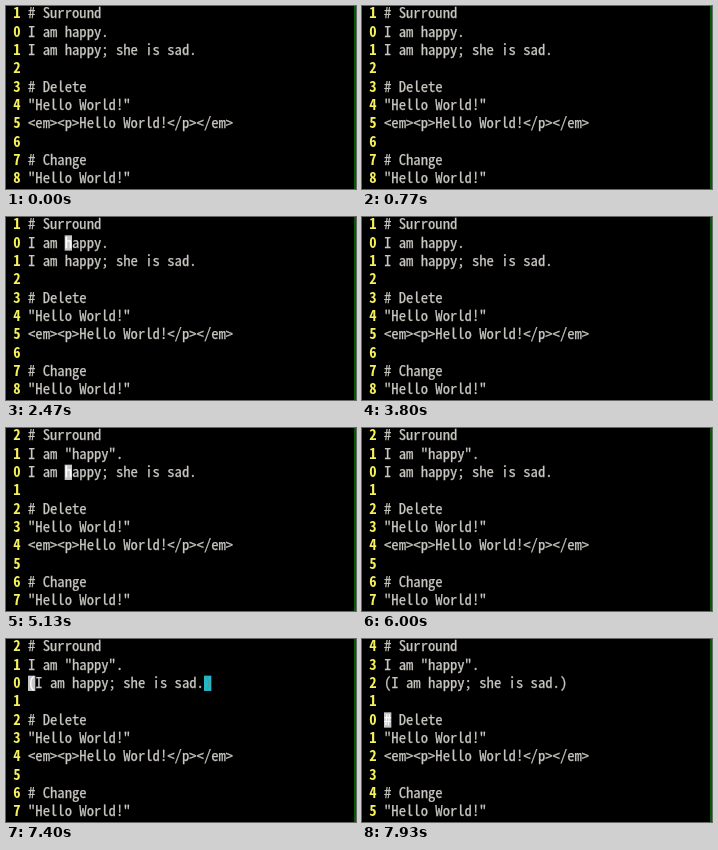
These frames come from a looping animation (350x183 px, 8 s). An HTML page:

```html
<!DOCTYPE html>
<html lang="en">
<head>
<meta charset="utf-8">
<title>Surround demo</title>
<style>
  html, body { margin: 0; width: 100%; height: 100%; overflow: hidden; background: #000; }
  svg { display: block; width: 350px; height: 183px; }
  text {
    font-family: "Noto Sans Mono CJK JP", "Noto Sans Mono", "DejaVu Sans Mono", monospace;
    font-variant-ligatures: none;
    fill: #c9c7c1;
    stroke: #c9c7c1;
    stroke-width: .25px;
  }
  .number { font-weight: 700; fill: #f6f05c; stroke: none; }
  .under { fill: #fff; stroke: #fff; }
  .paired { fill: #4f9aa2; stroke: none; }
</style>
</head>
<body>
<svg id="stage" viewBox="0 0 350 183"></svg>
<script>
const LOOP = 8000;
const CELL = 22 / 3, PITCH = 55 / 3, LEFT = 22, BASE = 12.3;
const FONTS = '"Noto Sans Mono CJK JP", "Noto Sans Mono", "DejaVu Sans Mono", monospace';
const stage = document.getElementById('stage');

const LINES = [
  '# Surround', 'I am happy.', 'I am happy; she is sad.', '',
  '# Delete', '"Hello World!"', '<em><p>Hello World!</p></em>', '',
  '# Change', '"Hello World!"'
];

// Times at which a line is rewritten.
const EDITS = [
  { at: 4330, row: 1, text: 'I am "happy".' },
  { at: 7200, row: 2, text: '(I am happy; she is sad.)' }
];

// Spans in which the block cursor is lit; "fade" marks a soft appearance.
const CURSOR = [
  { from: 270, to: 770, row: 1, col: 0, fade: true },
  { from: 1270, to: 1770, row: 1, col: 0, fade: true },
  { from: 2000, to: 2400, row: 1, col: 2, fade: true },
  { from: 2400, to: 3800, row: 1, col: 5 },
  { from: 4330, to: 5000, row: 1, col: 5, fade: true },
  { from: 5000, to: 5830, row: 2, col: 5 },
  { from: 6330, to: 6630, row: 2, col: 5, fade: true },
  { from: 7200, to: 7630, row: 2, col: 0, match: 24, fade: true },
  { from: 7630, to: 8000, row: 4, col: 0 }
];

function add(tag, attrs, parent = stage) {
  const node = document.createElementNS('http://www.w3.org/2000/svg', tag);
  for (const key in attrs) node.setAttribute(key, attrs[key]);
  return parent.appendChild(node);
}

// Pick the font size whose advance equals one terminal cell.
function cellFontSize() {
  const pen = document.createElement('canvas').getContext('2d');
  pen.font = '100px ' + FONTS;
  return 100 * CELL / pen.measureText('M').width;
}

const cellX = col => LEFT + col * CELL;
const baseline = row => BASE + row * PITCH;

function addBlock(fill, glyphClass) {
  const group = add('g', {});
  add('rect', { width: CELL, height: 15.3, fill }, group);
  const glyph = add('text', { y: BASE, class: glyphClass }, group);
  return { group, glyph };
}

function placeBlock(block, row, col, char, opacity) {
  block.group.setAttribute('transform', `translate(${cellX(col)} ${row * PITCH})`);
  block.group.setAttribute('opacity', opacity);
  block.glyph.textContent = char;
}

stage.style.fontSize = cellFontSize() + 'px';
add('rect', { width: 350, height: 183, fill: '#000' });
add('rect', { x: 348, width: 2, height: 183, fill: '#075807' });
const rows = LINES.map((_, row) => ({
  number: add('text', { x: cellX(-2), y: baseline(row), class: 'number' }),
  text: add('text', { x: LEFT, y: baseline(row) })
}));
const matchBlock = addBlock('#1fbac6', 'paired');
const cursorBlock = addBlock('#c7c7c7', 'under');

function render(time) {
  const lines = LINES.slice();
  for (const edit of EDITS) if (time >= edit.at) lines[edit.row] = edit.text;

  const current = time < 5000 ? 1 : time < 7630 ? 2 : 4;
  rows.forEach((row, i) => {
    row.number.textContent = Math.abs(i - current);
    row.text.textContent = lines[i];
  });

  const span = CURSOR.find(s => time >= s.from && time < s.to);
  cursorBlock.group.style.display = span ? '' : 'none';
  matchBlock.group.style.display = span && span.match ? '' : 'none';
  if (!span) return;

  const step = Math.floor((time - span.from) / 33);
  const opacity = span.fade ? Math.min(1, 0.4 + 0.35 * step) : 1;
  const line = lines[span.row];
  placeBlock(cursorBlock, span.row, span.col, line[span.col], opacity);
  if (span.match) placeBlock(matchBlock, span.row, span.match, line[span.match], opacity);
}

const start = performance.now();
function tick() {
  render((performance.now() - start) % LOOP);
  requestAnimationFrame(tick);
}
tick();
</script>
</body>
</html>
```
